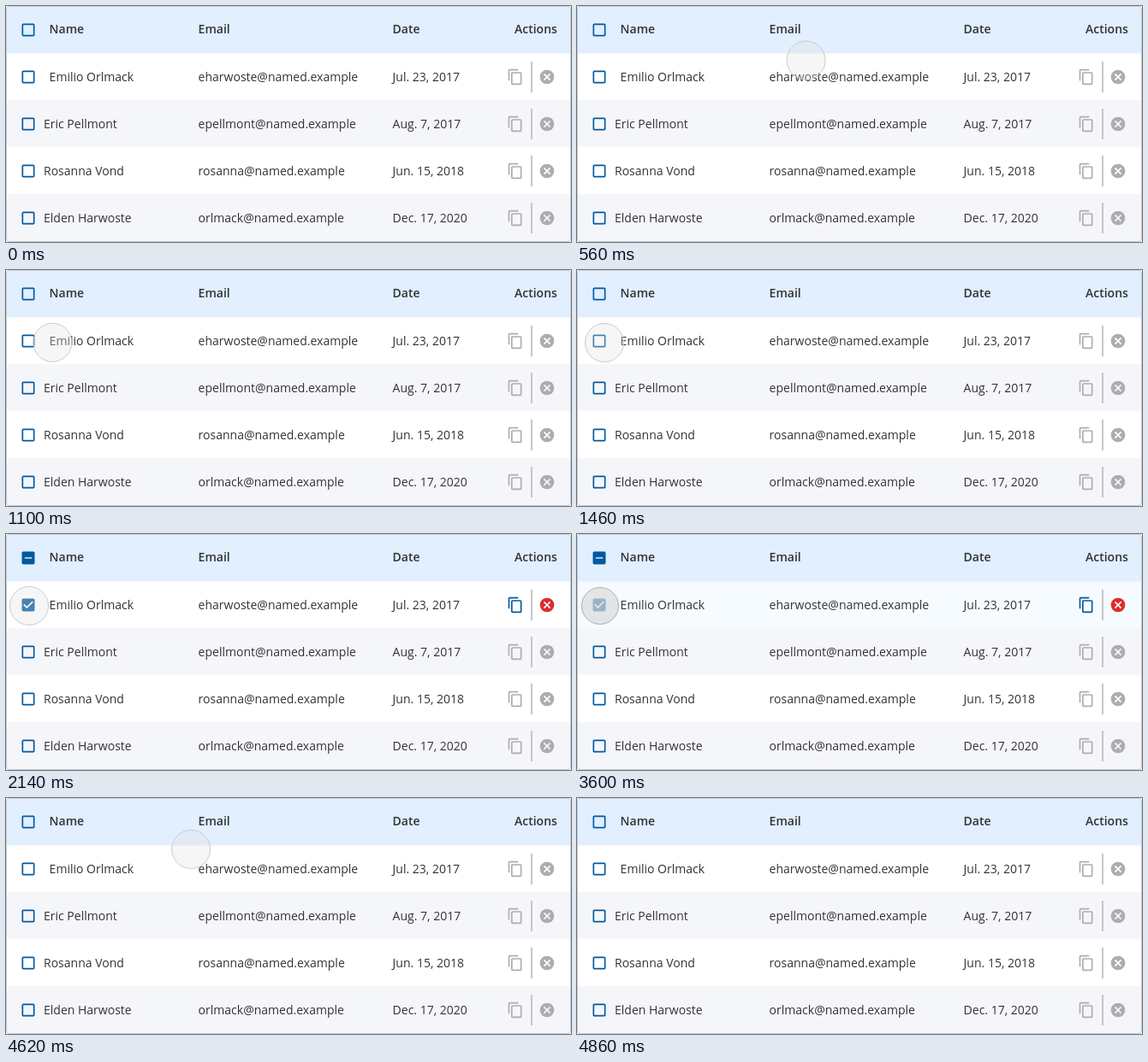
An HTML page for the animation above (5940 ms loop, 660 px wide and 276 px high).

```html
<!DOCTYPE html>
<html lang="en">
<head>
<meta charset="utf-8">
<title>Selectable table</title>
<style>
  html, body { margin: 0; width: 100%; height: 100%; overflow: hidden; background: #fff; }
  svg { display: block; width: 660px; height: 276px; }
  text { font: 14px "Open Sans", sans-serif; fill: #333; }
  .head { font-weight: 600; }
  .box { fill: #005a9f; }
  .icon { fill: #adadad; }
  .active .copy { fill: #005a9f; }
  .active .cancel { fill: #e02b2b; }
</style>
</head>
<body>
<svg id="stage" viewBox="0 0 660 276" xmlns="http://www.w3.org/2000/svg"></svg>
<script>
const LOOP = 5940;
const ROWS = [
  ["Emilio Orlmack", "eharwoste@named.example", "Jul. 23, 2017"],
  ["Eric Pellmont", "epellmont@named.example", "Aug. 7, 2017"],
  ["Rosanna Vond", "rosanna@named.example", "Jun. 15, 2018"],
  ["Elden Harwoste", "orlmack@named.example", "Dec. 17, 2020"],
];
// Icon outlines on a 24 unit grid, drawn at 20px
const FULL = "M5 3H19Q21 3 21 5V19Q21 21 19 21H5Q3 21 3 19V5Q3 3 5 3Z";
const ICONS = {
  empty: FULL + "M5 5V19H19V5Z",
  partial: FULL + "M7 11V13H17V11Z",
  checked: FULL + "M10 17L19 8L17.6 6.6L10 14.2L6.4 10.6L5 12Z",
  copy: "M16 1H4Q2 1 2 3V17H4V3H16ZM19 5H8Q6 5 6 7V21Q6 23 8 23H19Q21 23 21 21V7Q21 5 19 5ZM19 21H8V7H19Z",
  cancel: "M12 2A10 10 0 1 1 12 22A10 10 0 1 1 12 2ZM17 8.4L15.6 7L12 10.6L8.4 7L7 8.4L10.6 12L7 15.6L8.4 17L12 13.4L15.6 17L17 15.6L13.4 12Z",
};

const icon = (name, x, y, attrs) =>
  `<path ${attrs} fill-rule="evenodd" transform="translate(${x - 10} ${y - 10}) scale(${20 / 24})" d="${ICONS[name]}"/>`;
const label = (text, x, y, cls = "") => `<text class="${cls}" x="${x}" y="${y}">${text}</text>`;

function row([name, email, date], i) {
  const y = 83 + 55 * i;
  return `<g id="row${i}">
    <rect class="back" x="0" y="${y - 28}" width="660" height="56" fill="${i % 2 ? "#f5f6fa" : "#fff"}"/>
    ${icon("empty", 26, y, 'class="box"')}
    ${label(name, i ? 44 : 50.6, y + 5)}${label(email, 224.6, y + 5)}${label(date, 451.6, y + 5)}
    ${icon("copy", 595, y, 'class="icon copy"')}
    <rect x="613" y="${y - 18}" width="2" height="36" fill="#c6c6c6"/>
    ${icon("cancel", 632, y, 'class="icon cancel"')}
  </g>`;
}

const stage = document.getElementById("stage");
stage.innerHTML = `
  <clipPath id="card"><rect width="660" height="276" rx="4"/></clipPath>
  <g clip-path="url(#card)">
    ${ROWS.map(row).join("")}
    <rect width="660" height="55.5" fill="#e1effe"/>
    ${icon("empty", 26, 28, 'id="all" class="box"')}
    ${label("Name", 50.6, 32, "head")}${label("Email", 224.6, 32, "head")}
    ${label("Date", 451.6, 32, "head")}${label("Actions", 594, 32, "head")}
  </g>
  <rect x=".5" y=".5" width="659" height="275" rx="3.5" fill="none" stroke="#c8c8c8"/>
  <circle id="cursor"/>`;

const cursor = document.getElementById("cursor");
const selectAll = document.getElementById("all");
const firstRow = document.getElementById("row0");
const firstBox = firstRow.querySelector(".box");
const firstBack = firstRow.querySelector(".back");

const progress = (t, start, end) => Math.min(1, Math.max(0, (t - start) / (end - start)));
const mix = (a, b, p) => a + (b - a) * p;
const between = (t, start, end) => t >= start && t < end;

function cursorAt(t) {
  if (t < 1580) {
    const left = 1 - progress(t, 280, 1480);
    return [mix(32, 511, left ** 2.66), mix(85, -6, left ** 5.4)];
  }
  if (t < 4240) {
    const p = progress(t, 1580, 1780);
    return [mix(32, 27, p), mix(85, 84, p)];
  }
  const p = progress(t, 4240, 4840);
  return [mix(27, 520, p ** 2.11), mix(84, 0, p ** 2.76)];
}

function setAttrs(node, attrs) {
  for (const key in attrs) node.setAttribute(key, attrs[key]);
}

function render(t) {
  const selected = between(t, 2140, 3760);
  const pressed = between(t, 1980, 2140) || between(t, 3600, 3760);
  const [cx, cy] = cursorAt(t);

  setAttrs(selectAll, { d: selected ? ICONS.partial : ICONS.empty });
  setAttrs(firstBox, { d: selected ? ICONS.checked : ICONS.empty });
  setAttrs(firstRow, { class: selected ? "active" : "" });
  setAttrs(firstBack, { fill: selected && pressed ? "#f6fbff" : "#fff" });
  setAttrs(cursor, {
    cx, cy,
    r: pressed ? 21.5 : 22.5,
    fill: pressed ? "rgba(219,219,219,.7)" : "rgba(225,225,225,.3)",
    stroke: pressed ? "#aeaeae" : "#cbcbcb",
    visibility: between(t, 280, 4860) ? "visible" : "hidden",
  });
}

const begin = performance.now();
function tick() {
  render((performance.now() - begin) % LOOP);
  requestAnimationFrame(tick);
}
tick();
</script>
</body>
</html>
```
